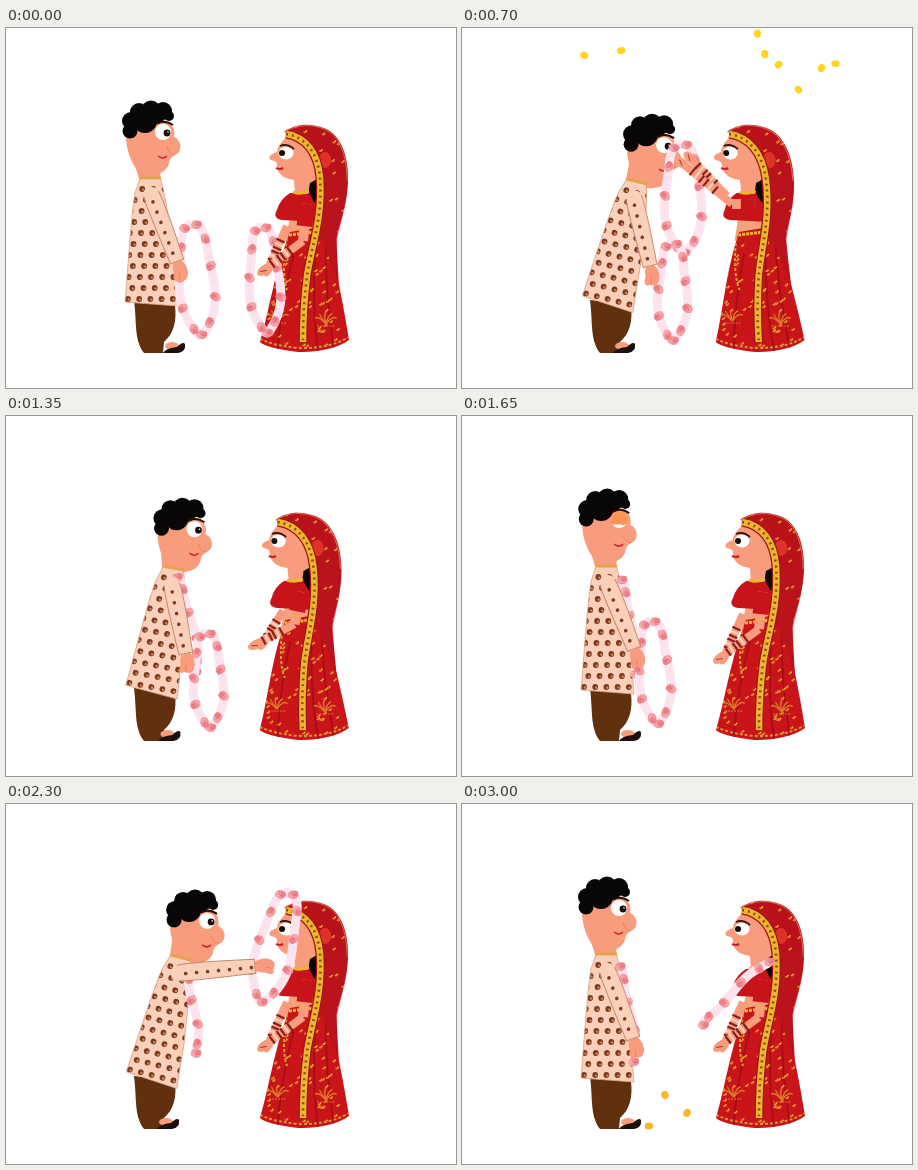
These frames come from a looping animation (450x360 px, 3050 ms). An HTML page with a canvas:

```html
<!DOCTYPE html>
<html lang="en">
<head>
<meta charset="utf-8">
<title>Garland ceremony</title>
<style>
html, body { margin: 0; width: 450px; height: 360px; overflow: hidden; background: #fff; }
canvas { display: block; }
</style>
</head>
<body>
<canvas id="stage" width="450" height="360"></canvas>
<script>
const ctx = document.getElementById('stage').getContext('2d');
const LOOP = 3050, STEP = 50, TAU = Math.PI * 2;
const SKIN = '#f99b7d', CLOTH = '#fbd0ba', BROWN = '#7a3b22', GOLD = '#edb62c';

// Monotone cubic interpolation over rows of [time, ...values]
function track(rows, t) {
  const last = rows.length - 1;
  if (t >= rows[last][0]) return rows[last].slice(1);
  let i = 0;
  while (t >= rows[i + 1][0]) i++;
  const slope = (j, c) => (rows[j + 1][c] - rows[j][c]) / (rows[j + 1][0] - rows[j][0]);
  const tangent = (j, c) => {
    if (j === 0 || j === last) return 0;
    const a = slope(j - 1, c), b = slope(j, c);
    return a * b <= 0 ? 0 : 2 * a * b / (a + b);
  };
  const h = rows[i + 1][0] - rows[i][0], u = (t - rows[i][0]) / h;
  return rows[i].slice(1).map((v, k) => {
    const c = k + 1, w = rows[i + 1][c];
    const m = tangent(i, c) * h, n = tangent(i + 1, c) * h;
    return v + m * u + (3 * (w - v) - 2 * m - n) * u * u + (2 * (v - w) + m + n) * u ** 3;
  });
}

function random(seed) {
  return () => {
    seed = (seed * 16807) % 2147483647;
    return seed / 2147483647;
  };
}

function shape(d, fill) {
  ctx.fillStyle = fill;
  ctx.fill(new Path2D(d));
}

function line(d, color, width, dash = []) {
  ctx.strokeStyle = color;
  ctx.lineWidth = width;
  ctx.setLineDash(dash);
  ctx.stroke(new Path2D(d));
  ctx.setLineDash([]);
}

function dot(x, y, r, fill, ry = r, turn = 0) {
  ctx.fillStyle = fill;
  ctx.beginPath();
  ctx.ellipse(x, y, r, ry, turn, 0, TAU);
  ctx.fill();
}

function inside(d, draw) {
  ctx.save();
  ctx.clip(new Path2D(d));
  draw();
  ctx.restore();
}

const path = (...pts) => 'M' + pts.map(p => p.join(' ')).join('L');
const mix = (a, b, u) => [a[0] + (b[0] - a[0]) * u, a[1] + (b[1] - a[1]) * u];

// Motion
const LEAN = [[0, 0], [400, 1], [700, 1.1], [1050, 1.24], [1250, 1.05], [1600, 0], [1700, 0.02],
  [2000, 1.06], [2250, 1.08], [2550, 0.95], [2920, 0], [3050, 0]];
const BOW = [[0, 0], [400, 0.018], [800, 0.07], [1050, 0.075], [1200, 0.07], [1550, 0], [3050, 0]];
const GROOM_HAND = [[0, 174, 241], [400, 188, 243], [1050, 191, 248], [1600, 174, 241], [1700, 178, 239],
  [2000, 253, 183], [2200, 264, 150], [2350, 250, 172], [2550, 189, 249], [2950, 174, 242], [3050, 174, 242]];
// far elbow, far hand, near elbow, near hand
const BRIDE_ARMS = [
  [0, 281, 198, 262, 241, 297, 213, 258, 242],
  [400, 277, 191, 238, 183, 291, 211, 243, 233],
  [700, 265, 168, 228, 130, 270, 176, 220, 135],
  [880, 262, 170, 226, 132, 264, 176, 212, 136],
  [1050, 264, 179, 236, 163, 264, 187, 218, 168],
  [1500, 281, 198, 262, 241, 297, 213, 258, 242],
  [3050, 281, 198, 262, 241, 297, 213, 258, 242]];
// top, bottom, half width, visible share of the loop
const HIS = [
  [0, 186, 196, 195, 307, 17, 1], [400, 208, 206, 208, 312, 15, 1],
  [1050, 212, 222, 212, 313, 14, 1], [1650, 189, 205, 196, 308, 15, 1],
  [2000, 221, 129, 242, 238, 16, 1], [2250, 272, 88, 258, 200, 17, 1],
  [2400, 300, 92, 247, 196, 18, 1], [2550, 304, 101, 246, 195, 15, 1],
  [2800, 307, 140, 240, 215, 8, 0.65], [3000, 308, 157, 242, 222, -4, 0.52], [3050, 308, 157, 242, 222, -4, 0.52]];
const HERS = [
  [0, 256, 199, 261, 305, 15, 1], [400, 243, 204, 250, 306, 16, 1],
  [700, 220, 116, 222, 225, 18, 1], [880, 200, 96, 210, 212, 20, 1],
  [1050, 179, 159, 208, 258, 10, 0.62], [1250, 174, 160, 198, 256, 8, 0.55], [1600, 157, 163, 173, 258, 5, 0.52],
  [2000, 177, 165, 188, 262, 5, 0.52], [2550, 176, 162, 191, 240, 5, 0.52],
  [2950, 156, 162, 172, 258, 5, 0.52], [3050, 156, 162, 172, 258, 5, 0.52]];

// Garlands
function flower(x, y, i) {
  ctx.save();
  ctx.translate(x, y);
  ctx.rotate(i * 1.3);
  dot(0, 0, 5.2, '#f39298', 4.3);
  dot(-2.6, 1, 2.7, '#f6a5a8');
  dot(2.4, -1.4, 2.7, '#ee8088');
  line('M-2 -1Q0 2 3 0', '#d9656f', 0.7);
  ctx.restore();
}

function garland([x, y, bx, by, w, share]) {
  const dx = bx - x, dy = by - y, len = Math.hypot(dx, dy);
  const at = u => {
    const s = (1 - Math.cos(u * TAU)) / 2, side = w * Math.sin(u * TAU) + Math.sin(u * 25) * 1.5;
    return [x + dx * s + dy / len * side, y + dy * s - dx / len * side];
  };
  const pts = Array.from({ length: 61 }, (_, i) => at(i / 60 * share));
  line(path(...pts), '#fbe3f0', 9);
  line(path(...pts), '#f7d3e6', 1, [1, 3]);
  for (let i = 0; i < 11; i++) {
    const u = (i + 0.35) / 11;
    if (u < share) flower(...at(u), i);
  }
}

// Groom
const HAIR = [[125, 93, 9], [124, 103, 7.5], [133, 84, 9], [145, 82, 9.5], [157, 83, 9], [163, 88, 5], [139, 93, 12], [151, 89, 7]];
const KURTA = 'M134 150L154 150C161 170 163 200 168 230L172 278L119 274C122 240 125 190 129 165Z';

function groomLegs(lean) {
  shape('M128 272L169 277C171 295 167 306 158 314L157 325L138 325C128 312 131 296 128 272Z', '#60300f');
  ctx.save();
  ctx.translate(-6 * Math.min(lean, 1), 0);
  dot(166, 318, 7, SKIN, 4);
  shape('M157 325Q160 320 171 319Q177 313 179 316Q180 324 172 325Z', '#1c100c');
  ctx.restore();
}

function groomHead(lean, blink) {
  const dx = 41 * lean, dy = 12 * lean, k = Math.min(lean, 1);
  shape(path([123 + dx, 118 + dy], [156 + dx, 138 + dy], [153 + 29 * k, 154 + 4 * k], [134 + 29 * k, 154 + 2 * k]), SKIN);
  ctx.save();
  ctx.translate(dx, dy);
  shape('M120 112C122 98 138 92 152 91C166 92 170 101 168 109C176 112 177 124 169 127C165 129 163 132 163 136C160 145 150 147 142 147C130 146 122 130 120 112Z', SKIN);
  HAIR.forEach(([x, y, r]) => dot(x, y, r, '#080606'));
  dot(157, 104, 8, '#fff');
  dot(161, 105, 3.4, '#160b08');
  dot(162, 104, 0.8, '#fff');
  if (blink > 0) {
    ctx.save();
    ctx.beginPath();
    ctx.rect(148, 95, 18, 18 * blink);
    ctx.clip();
    dot(157, 104, 8.3, '#fd9550');
    ctx.restore();
  }
  line('M150 96Q158 91 167 97', '#211008', 2);
  line('M161 119Q163 127 169 126', '#ec8265', 1);
  line('M152 128Q157 132 161 128', '#c92f2c', 1.6);
  ctx.restore();
}

function kurtaSpace(lean, draw) {
  ctx.save();
  ctx.translate(145, 276);
  ctx.rotate(Math.min(lean, 1) * 14 * Math.PI / 180);
  ctx.translate(-145, -276);
  draw();
  ctx.restore();
}

function motif(x, y) {
  dot(x, y, 2.9, BROWN);
  dot(x + 0.9, y + 0.6, 1.2, '#d08a55');
}

function groomBody(lean) {
  kurtaSpace(lean, () => {
    shape(KURTA, CLOTH);
    inside(KURTA, () => {
      for (let r = 0; r < 11; r++) {
        for (let c = 0; c < 5; c++) motif(125 + c * 11.2 + (r % 2) * 4 - r * 0.3, 161 + r * 11);
      }
    });
    line(KURTA, '#dba286', 0.8);
    line('M134 150L155 150', '#e2a34a', 3);
  });
}

function groomArm(lean, hand) {
  const a = Math.min(lean, 1) * 14 * Math.PI / 180;
  const sh = [145 + 110 * Math.sin(a), 276 - 110 * Math.cos(a)];
  const ang = Math.atan2(hand[1] - sh[1], hand[0] - sh[0]);
  const len = Math.hypot(hand[0] - sh[0], hand[1] - sh[1]);
  ctx.save();
  ctx.translate(...sh);
  ctx.rotate(ang);
  dot(len + 1, 0, 11, SKIN, 7);
  dot(len + 5, 5, 6, SKIN, 3.5, 0.5);
  line(`M${len + 3} 2L${len + 11} 4`, '#e98063', 0.8);
  const sleeve = `M-4 -7Q10 -10 ${len - 8} -7L${len - 7} 7Q10 9 -4 7Q-10 0 -4 -7Z`;
  shape(sleeve, CLOTH);
  line(`M0 8Q10 9 ${len - 8} 7L${len - 8} -7Q10 -10 0 -8`, '#c58b6c', 1);
  for (let x = 8; x < len - 10; x += 11) dot(x, 1, 1.8, BROWN);
  ctx.restore();
}

// Bride
const SKIRT = 'M284 204L320 198C330 240 338 280 343 312C330 322 300 326 285 323C270 321 258 318 254 314C264 280 268 245 284 204Z';
const VEIL = 'M278 104C290 95 305 95 318 100C336 107 343 130 342 155C341 178 333 196 330 212L318 215C314 190 318 170 315 150C313 125 300 108 278 104Z';
const HEM = 'M280 106C300 109 312 125 314 150C317 190 305 220 301 248C297 280 297 300 297 314';

function sprinkle(clip, n, seed, x, y, w, h) {
  const rnd = random(seed);
  inside(clip, () => {
    for (let i = 0; i < n; i++) {
      const px = x + rnd() * w, py = y + rnd() * h;
      dot(px, py, 1.5, '#dd8b2c', 1);
      dot(px + 1.4, py - 1.2, 0.9, GOLD);
    }
  });
}

function lotus(x, y) {
  for (let i = -2; i <= 2; i++) {
    const a = i * 0.55;
    line(`M${x} ${y + 6}Q${x + 9 * Math.sin(a - 0.3)} ${y - 3} ${x + 12 * Math.sin(a)} ${y + 6 - 12 * Math.cos(a)}`, '#dc7a28', 1.4);
  }
  line(`M${x - 9} ${y + 8}L${x + 9} ${y + 8}`, '#dc7a28', 1.2, [2, 1]);
}

function bride(bow) {
  ctx.save();
  ctx.transform(1, 0, bow, 1, -bow * 318, 0);
  shape('M314 150L341 160C340 182 334 196 331 212L331 238C322 218 316 195 314 150Z', '#ee7580');
  shape('M284 190L312 190L316 212L279 213Z', '#f6a27c');
  shape(SKIRT, '#c9141a');
  inside(SKIRT, () => {
    line('M320 200Q318 260 328 322M309 230Q306 280 312 324M288 225Q274 280 272 322', '#a90e16', 2);
    line('M254 311Q272 319 296 320Q325 320 343 309', '#df9430', 2, [3, 2]);
    line('M281 210Q275 245 281 262', '#dca02c', 2, [3, 2]);
    line('M283 207L317 203', GOLD, 3, [3, 1]);
  });
  sprinkle(SKIRT, 85, 77, 252, 215, 92, 104);
  lotus(272, 287);
  lotus(320, 290);
  shape('M284 165L312 164L315 194L276 192Q266 190 271 182Q274 171 284 165Z', '#c9131b');
  shape('M302 148L315 146Q316 165 309 175Q304 168 301 158Z', '#0d0808');
  shape('M284 107C276 112 271 119 271 124C265 126 261 129 265 132C269 133 271 134 271 137C270 144 277 151 288 152L289 166L302 166L304 155L313 150C313 125 300 108 284 107Z', SKIN);
  line('M287 164Q295 167 303 163', GOLD, 3);
  dot(280, 125, 7.5, '#fff', 6.5);
  dot(276, 125, 3, '#150a0a');
  line('M274 118Q281 115 288 121', '#3a1512', 1.8);
  line('M270 140Q274 142 277 140', '#c71f2b', 2.2);
  shape(VEIL, '#b9121b');
  shape('M313 150L337 150Q334 180 330 205L333 260Q322 222 312 205Z', '#bb131b');
  dot(319, 132, 6, '#df3328', 8);
  sprinkle(VEIL, 32, 19, 285, 98, 57, 112);
  line(HEM, '#a0121a', 9);
  line(HEM, GOLD, 6.5);
  line(HEM, '#8d4a16', 2.6, [2, 4]);
  line('M279 104C291 96 306 96 318 101C335 108 341 130 341 153', '#e26a50', 1);
  ctx.restore();
}

function forearm(elbow, hand) {
  const ang = Math.atan2(hand[1] - elbow[1], hand[0] - elbow[0]);
  const len = Math.hypot(hand[0] - elbow[0], hand[1] - elbow[1]);
  line(path(elbow, hand), SKIN, 8);
  ctx.save();
  ctx.translate(...elbow);
  ctx.rotate(ang);
  dot(len, 0, 8, SKIN, 4.5);
  for (let i = 0; i < 6; i++) {
    const x = len * (0.34 + i * 0.09);
    line(`M${x} -4.5L${x} 4.5`, i % 3 === 1 ? '#f6d4bb' : '#8b1d1a', 2.2);
  }
  line(`M${len - 2} -2L${len + 4} 1`, '#9a4329', 1);
  ctx.restore();
}

function brideArms([fx, fy, hx, hy, ex, ey, nx, ny], bow) {
  const shoulder = [301 - bow * 145, 176], elbow = [ex, ey];
  forearm([fx, fy], [hx, hy]);
  line(path(shoulder, elbow), SKIN, 10);
  forearm(elbow, [nx, ny]);
  line(path(shoulder, mix(shoulder, elbow, 0.6)), '#c9131b', 16);
  line(path(mix(shoulder, elbow, 0.72), mix(shoulder, elbow, 0.76)), GOLD, 8);
}

// Petals: each shower ends at the listed places
const SHOWERS = [
  { begin: 560, end: 1050, color: '#ffd426', seed: 41,
    spots: [[190, 214], [212, 232], [175, 242], [203, 268], [215, 268], [286, 238], [327, 262], [243, 268], [233, 308], [133, 322]] },
  { begin: 2560, end: 3000, color: '#f6b72d', seed: 93, spots: [[203, 291], [225, 309], [187, 322]] }
];

function petals(t) {
  for (const s of SHOWERS) {
    if (t < s.begin || t > s.end + 150) continue;
    const rnd = random(s.seed);
    const all = s.spots.slice();
    for (let i = 0; i < 16; i++) all.push([107 + rnd() * 272, 335 + rnd() * 150]);
    all.forEach(([x, y], i) => {
      const py = y + (t - s.end) * 1.2;
      if (py > -5 && py < 323) dot(x, py, 4.2, s.color, 3.5, i + t / 150);
    });
  }
}

const blinkAt = t => Math.max(0, 0.75 - Math.abs(t - 1650) / 110, 1.15 - Math.abs(t - 2550) / 85);

function render(t) {
  ctx.fillStyle = '#fff';
  ctx.fillRect(0, 0, 450, 360);
  ctx.lineJoin = 'round';
  const [lean] = track(LEAN, t), [bow] = track(BOW, t);
  bride(bow);
  groomLegs(lean);
  groomHead(lean, Math.min(1, blinkAt(t)));
  groomBody(lean);
  garland(track(HERS, t));
  garland(track(HIS, t));
  brideArms(track(BRIDE_ARMS, t), bow);
  groomArm(lean, track(GROOM_HAND, t));
  petals(t);
}

const start = performance.now();
function tick() {
  const t = (performance.now() - start) % LOOP;
  render(Math.floor(t / STEP) * STEP);
  requestAnimationFrame(tick);
}
tick();
</script>
</body>
</html>
```
